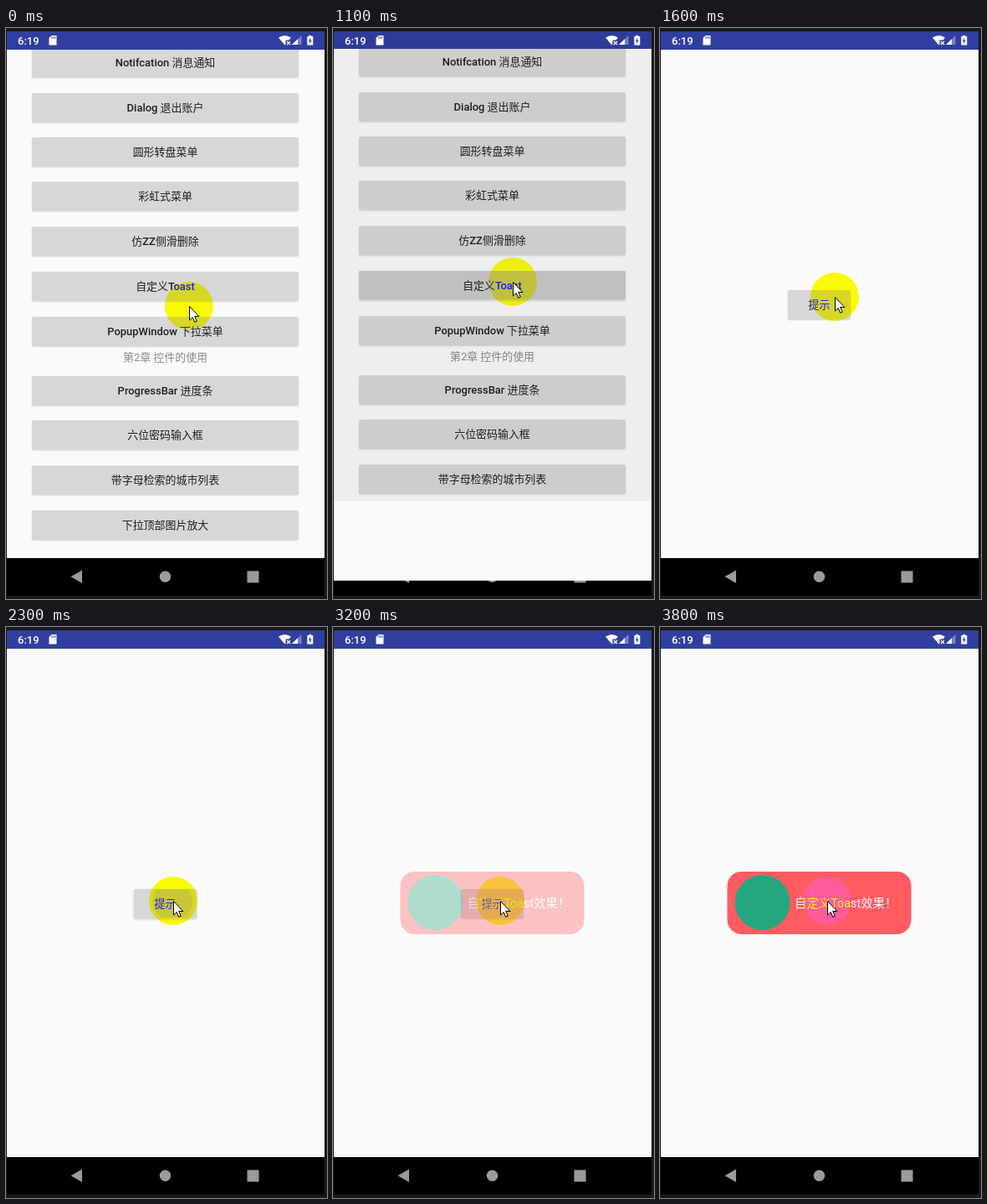
Recreate the animation shown at these times as an HTML page with a canvas. Size 384 by 684 pixels, loop 4400 ms.

```html
<!DOCTYPE html>
<html lang="zh-CN">
<head>
<meta charset="utf-8">
<style>
  html, body { margin: 0; width: 100%; height: 100%; overflow: hidden; background: #1a1a18; }
  canvas { display: block; }
</style>
</head>
<body>
<canvas id="stage" width="384" height="684"></canvas>
<script>
const ctx = document.getElementById('stage').getContext('2d');
const LOOP = 4400, STEP = 100;
const PAGE = '#fafafa', BUTTON = '#d6d7d7', PRESSED = '#b3b3b3', BAR = '#303f9f', NAV_ICON = '#9b9b9b';
const PAGE_END = 635;
const FONT = 'Roboto, "Noto Sans CJK SC", "Noto Sans CJK", sans-serif';

const menu = [
  ['Notifcation 消息通知', 24], ['Dialog 退出账户', 78], ['圆形转盘菜单', 131],
  ['彩虹式菜单', 184], ['仿ZZ侧滑删除', 238], ['自定义Toast', 292],
  ['PopupWindow 下拉菜单', 346], ['ProgressBar 进度条', 417], ['六位密码输入框', 470],
  ['带字母检索的城市列表', 524], ['下拉顶部图片放大', 578]
];

// Pointer path: time, x, y
const path = [[0, 219, 333], [400, 215, 304], [1400, 215, 304],
  [1600, 209, 322], [2000, 200, 328], [LOOP, 200, 328]];

// Durations of the system animations
const RIPPLE_IN = 338, RIPPLE_SHOW = 112, RIPPLE_OUT = 225, LIFT = 150;
const OPEN_START = 1018, OPEN_TIME = 640, DIM_TIME = 175;
const TOAST_START = 3056, TOAST_TIME = 744;

const clamp = v => Math.max(0, Math.min(1, v));
const ramp = (t, from, to) => clamp((t - from) / (to - from));
const mix = (a, b, k) => a + (b - a) * k;

// y of a cubic curve at the given x
function curve(x, xs, ys) {
  const at = (p, s) => {
    const r = 1 - s;
    return p[0] * r * r * r + 3 * p[1] * s * r * r + 3 * p[2] * s * s * r + p[3] * s * s * s;
  };
  let lo = 0, hi = 1;
  for (let i = 0; i < 24; i++) {
    const mid = (lo + hi) / 2;
    if (at(xs, mid) < x) lo = mid; else hi = mid;
  }
  return at(ys, lo);
}
const slowIn = x => curve(x, [0, .4, .2, 1], [0, 0, 1, 1]);
const extraSlowIn = x => x < 1 / 6
  ? curve(x, [0, .05, .1333, 1 / 6], [0, 0, .06, .4])
  : curve(x, [1 / 6, .2083, .25, 1], [.4, .82, 1, 1]);

function rect(x, y, w, h, color) {
  ctx.fillStyle = color;
  ctx.fillRect(x, y, w, h);
}

function disc(x, y, r, color) {
  ctx.fillStyle = color;
  ctx.beginPath();
  ctx.arc(x, y, r, 0, Math.PI * 2);
  ctx.fill();
}

function polygon(color, ...points) {
  ctx.fillStyle = color;
  ctx.beginPath();
  points.forEach(([x, y]) => ctx.lineTo(x, y));
  ctx.closePath();
  ctx.fill();
}

function text(str, x, middle, color, size = 12.95, weight = 500, align = 'center') {
  ctx.font = `${weight} ${size}px ${FONT}`;
  ctx.textAlign = align;
  ctx.fillStyle = color;
  ctx.fillText(str, x, middle + size * .355);
}

function clipped(x, y, w, h, draw) {
  ctx.save();
  ctx.beginPath();
  ctx.rect(x, y, w, h);
  ctx.clip();
  draw();
  ctx.restore();
}

// The ripple grows from the touch point towards the middle of the button
function ripple(t, x, y, w, { down, up, touch }) {
  const grow = slowIn(ramp(t, down, down + RIPPLE_IN));
  clipped(x, y, w, 34, () => {
    ctx.globalAlpha = ramp(t, down, down + RIPPLE_SHOW) * (1 - ramp(t, up, up + RIPPLE_OUT));
    disc(mix(touch[0], x + w / 2, grow), mix(touch[1], y + 17.5, grow),
      mix(w * .3, Math.hypot(w, 35) / 2, grow), PRESSED);
  });
}

function button(t, label, x, y, w, press) {
  const lift = press ? ramp(t, press.down, press.down + LIFT) * (1 - ramp(t, press.drop, press.drop + LIFT)) : 0;
  ctx.save();
  ctx.shadowColor = `rgba(0,0,0,${.15 + .07 * lift})`;
  ctx.shadowBlur = 2 + 4 * lift;
  ctx.shadowOffsetY = 1 + lift;
  ctx.fillStyle = BUTTON;
  ctx.beginPath();
  ctx.roundRect(x, y, w, 35, 2);
  ctx.fill();
  ctx.restore();
  if (press) ripple(t, x, y, w, press);
  text(label, x + w / 2, y + 17.5, '#1f1f1f');
}

function page() {
  rect(1, 4, 380, 22, BAR);
  rect(1, 26, 380, PAGE_END - 26, PAGE);
}

function menuPage(t) {
  const press = { down: 458, up: 960, drop: 960, touch: [215, 304] };
  page();
  clipped(1, 26, 380, PAGE_END - 26, () => {
    menu.forEach(([label, y], i) => button(t, label, 31, y, 319, i === 5 && press));
    text('第2章 控件的使用', 190.5, 394, '#8a8a8a', 12.95, 400);
  });
}

function toastPage(t) {
  page();
  button(t, '提示', 153, 314, 75, { down: 2250, up: 2600, drop: 2850, touch: [200, 328] });
}

function navigation() {
  rect(1, PAGE_END, 380, 680 - PAGE_END, '#000');
  polygon(NAV_ICON, [91, 649.5], [91, 665], [77.5, 657.3]);
  disc(190.5, 657.3, 6.7, NAV_ICON);
  rect(288.5, 650.5, 14, 14, NAV_ICON);
}

function statusIcons() {
  const white = '#fff';
  text('6:19', 14, 15.2, white, 13, 500, 'left');
  polygon(white, [54.5, 9], [60.5, 9], [60.5, 20.5], [51.5, 20.5], [51.5, 12]);
  for (const x of [54.3, 56.3, 58.3]) rect(x, 10.3, 1, 2.4, BAR);

  ctx.fillStyle = white;
  ctx.beginPath();
  ctx.moveTo(326, 11.5);
  ctx.quadraticCurveTo(333.5, 6.5, 341, 11.5);
  ctx.lineTo(338.5, 14.5);
  ctx.lineTo(334.5, 14.5);
  ctx.lineTo(334.5, 19.5);
  ctx.lineTo(333.5, 20.5);
  ctx.fill();
  ctx.strokeStyle = white;
  ctx.lineWidth = 1.2;
  ctx.beginPath();
  ctx.moveTo(336, 16); ctx.lineTo(340, 20);
  ctx.moveTo(340, 16); ctx.lineTo(336, 20);
  ctx.stroke();

  polygon('rgba(255,255,255,.35)', [353.5, 9], [353.5, 20], [342, 20]);
  polygon(white, [349, 13.3], [349, 20], [342, 20]);
  rect(360.3, 10, 7, 10.5, white);
  rect(362.3, 8.8, 3, 1.5, white);
  polygon(BAR, [364.3, 11.5], [361.8, 15.8], [363.4, 15.8], [363.2, 19], [365.8, 14.7], [364.2, 14.7]);
}

function toastBox() {
  ctx.fillStyle = '#ff5b62';
  ctx.beginPath();
  ctx.roundRect(80.5, 293, 220, 75, 17);
  ctx.fill();
  disc(122.5, 330, 33, '#26a67f');
  text('自定义Toast效果！', 161, 331, '#fff', 14.4, 400, 'left');
}

// The toast is composed on its own layer so that it fades as one piece
const layer = document.createElement('canvas');
layer.width = 384;
layer.height = 684;
const layerCtx = layer.getContext('2d');

function toast(alpha) {
  layerCtx.clearRect(0, 0, 384, 684);
  ctx.save();
  ctx.globalAlpha = alpha;
  layerCtx.fillStyle = '#ff5b62';
  layerCtx.beginPath();
  layerCtx.roundRect(80.5, 293, 220, 75, 17);
  layerCtx.fill();
  layerCtx.fillStyle = '#26a67f';
  layerCtx.beginPath();
  layerCtx.arc(122.5, 330, 33, 0, Math.PI * 2);
  layerCtx.fill();
  layerCtx.font = `400 14.4px ${FONT}`;
  layerCtx.fillStyle = '#fff';
  layerCtx.fillText('自定义Toast效果！', 161, 336.1);
  ctx.drawImage(layer, 0, 0);
  ctx.restore();
}

function pointer(t) {
  const i = path.findIndex(p => p[0] > t);
  const [a, b] = [path[i - 1], path[i]];
  const k = ramp(t, a[0], b[0]);
  const x = mix(a[1], b[1], k), y = mix(a[2], b[2], k);
  ctx.save();
  // Inverts blue: light areas turn yellow, dark text turns blue
  ctx.globalCompositeOperation = 'difference';
  disc(x, y, 29, '#00f');
  ctx.restore();
  ctx.save();
  ctx.translate(x + .5, y + .5);
  polygon('#fff', [0, 0], [0, 16.5], [3.7, 13], [6.2, 18.8], [8.7, 17.7], [6.2, 12], [11.4, 12]);
  ctx.strokeStyle = '#000';
  ctx.lineWidth = 1;
  ctx.stroke();
  ctx.restore();
}

function draw(t) {
  rect(0, 0, 384, 684, '#1a1a18');
  navigation();
  const open = ramp(t, OPEN_START, OPEN_START + OPEN_TIME);
  const slide = slowIn(open);
  if (open < 1) clipped(1, 4, 380, PAGE_END - 4, () => {
    ctx.translate(0, -Math.round(14 * slide));
    menuPage(t);
    rect(1, 4, 380, 676, `rgba(0,0,0,${.1 * ramp(t, OPEN_START, OPEN_START + DIM_TIME)})`);
  });
  if (open > 0) {
    const hidden = Math.round(648 * (1 - extraSlowIn(open)));
    ctx.save();
    ctx.translate(0, Math.round(28 * (1 - slide)));
    clipped(1, 4 + hidden, 380, Math.max(0, PAGE_END - 4 - hidden), () => toastPage(t));
    ctx.restore();
  }
  statusIcons();
  const fade = ramp(t, TOAST_START, TOAST_START + TOAST_TIME);
  if (fade > 0) toast(1 - (1 - fade) ** 2);
  pointer(t);
}

const start = performance.now();
function tick() {
  const t = (performance.now() - start) % LOOP;
  draw(Math.floor(t / STEP) * STEP);
  requestAnimationFrame(tick);
}
tick();
</script>
</body>
</html>
```
